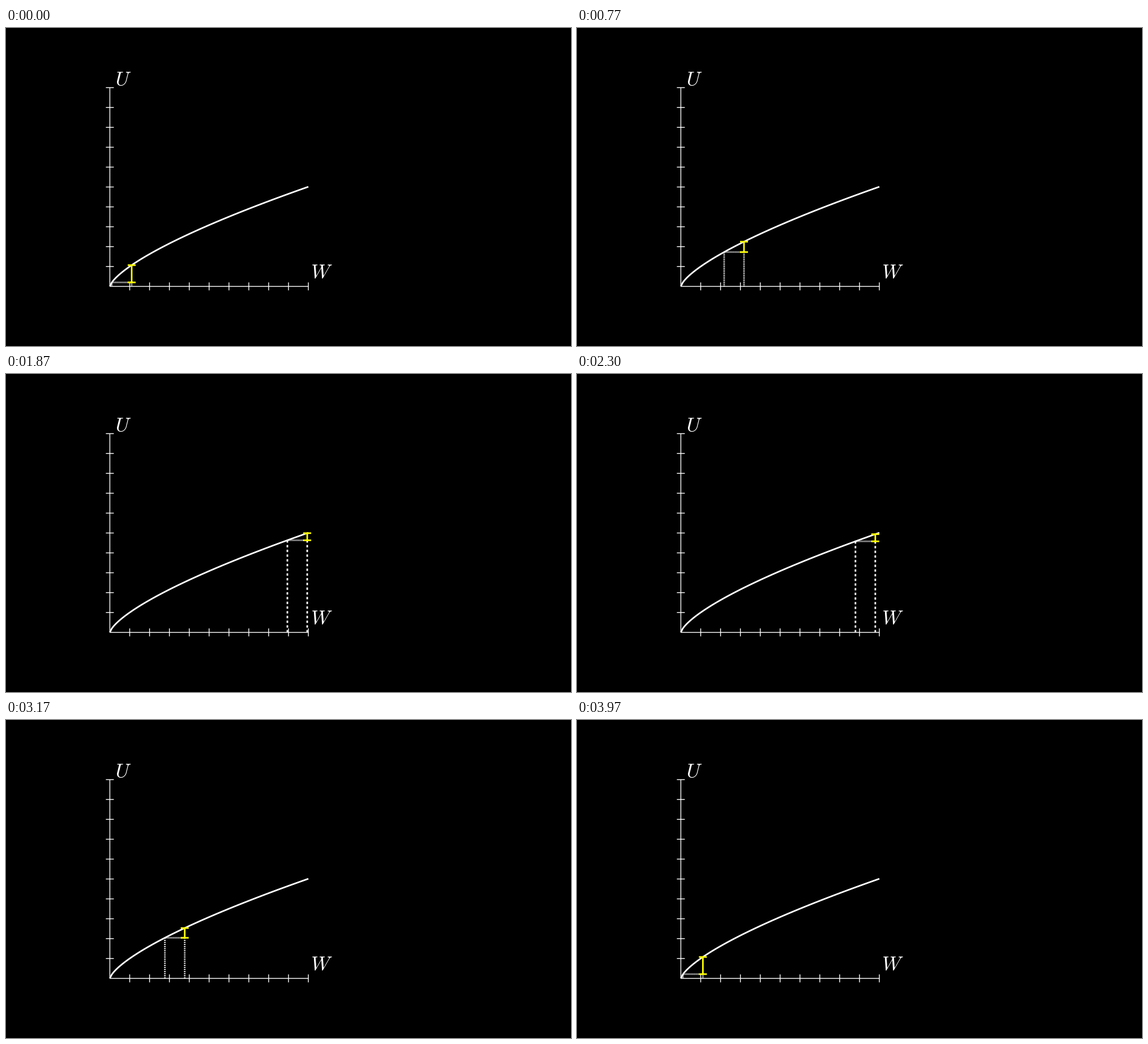
These frames come from a looping animation (998x561 px, 4.01 s). A matplotlib script:

```python
import numpy as np
import matplotlib.pyplot as plt
from matplotlib.animation import FuncAnimation
from matplotlib.patches import PathPatch
from matplotlib.textpath import TextPath
from matplotlib.transforms import Affine2D

plt.rcParams["mathtext.fontset"] = "cm"
plt.rcParams["path.simplify"] = False

W, H, DPI = 998, 561, 64
SCENE_H = 8.0                    # scene units over the stage height
UNIT = H / SCENE_H               # pixels per scene unit
THIN, THICK = 0.02, 0.04         # stroke widths in scene units
ORIGIN = np.array([-4.5, -2.5])
STEP, N_TICKS = 0.5, 10          # scene units per axis unit
TICK = 0.1
N_DASHES = 20
X_START, X_END, DX = 0.1, 9.0, 1.0
STEPS = 120                      # poses per loop, half out and half back
TICK_MS, LOOP_MS = 10, 4010

fig = plt.figure(figsize=(W / DPI, H / DPI), dpi=DPI, facecolor="black")
ax = fig.add_axes([0, 0, 1, 1])
ax.set_xlim(-W / UNIT / 2, W / UNIT / 2)
ax.set_ylim(-SCENE_H / 2, SCENE_H / 2)
ax.axis("off")


def utility(x):
    return x ** 0.7


def place(x, y):
    return ORIGIN[0] + STEP * x, ORIGIN[1] + STEP * y


def stroke(x=(), y=(), width=THICK, color="white", z=2):
    line, = ax.plot(x, y, color=color, lw=width * UNIT * 72 / DPI, zorder=z,
                    solid_capstyle="butt", snap=False)
    return line


def label(text, x, y, size=0.498):
    path = TextPath((0, 0), text, size=100)
    box = path.get_extents()
    move = (Affine2D()
            .translate(-(box.x0 + box.x1) / 2, -(box.y0 + box.y1) / 2)
            .scale(size / 100)
            .translate(x, y))
    ax.add_patch(PathPatch(move.transform_path(path), fc="white", lw=0))


def set_dashes(line, start, end):
    """Stretch a fixed number of dashes between two points."""
    a = np.arange(N_DASHES) / (N_DASHES - 0.5)
    b = a + 0.5 / (N_DASHES - 0.5)
    t = np.column_stack([a, b, np.full(N_DASHES, np.nan)]).ravel()
    line.set_data(start[0] + t * (end[0] - start[0]),
                  start[1] + t * (end[1] - start[1]))


def smooth(t, k=10):
    def sig(v):
        return 1 / (1 + np.exp(-v))
    low = sig(-k / 2)
    return (sig(k * (t - 0.5)) - low) / (1 - 2 * low)


# axes
ox, oy = ORIGIN
length = STEP * N_TICKS
stroke([ox, ox + length], [oy, oy], THIN)
stroke([ox, ox], [oy, oy + length], THIN)
for i in range(1, N_TICKS + 1):
    d = i * STEP
    stroke([ox + d] * 2, [oy - TICK, oy + TICK], THIN)
    stroke([ox - TICK, ox + TICK], [oy + d] * 2, THIN)
label("$U$", -4.147, 2.721)
label("$W$", 0.847, -2.127)

xs = np.linspace(0, N_TICKS, 101)
stroke(*place(xs, utility(xs)), z=3)

left, right, base = (stroke(z=4) for _ in range(3))
gauge = stroke(color="#ffff00", z=5)


def update(tick):
    step = min((3 * tick + 1) // 10, STEPS - 1)
    t = 2 * step / STEPS
    x = X_START + (X_END - X_START) * smooth(t if t < 1 else 2 - t)
    x1, y1 = place(x, utility(x))
    x2, y2 = place(x + DX, utility(x + DX))
    set_dashes(left, (x1, oy), (x1, y1))
    set_dashes(right, (x2, oy), (x2, y1))
    set_dashes(base, (x1, y1), (x2, y1))
    l, r, nan = x2 - TICK, x2 + TICK, np.nan
    gauge.set_data([l, r, nan, x2, x2, nan, l, r],
                   [y1, y1, nan, y1, y2, nan, y2, y2])
    return left, right, base, gauge


anim = FuncAnimation(fig, update, frames=LOOP_MS // TICK_MS, interval=TICK_MS,
                     repeat=True, repeat_delay=0)
plt.show()
```
